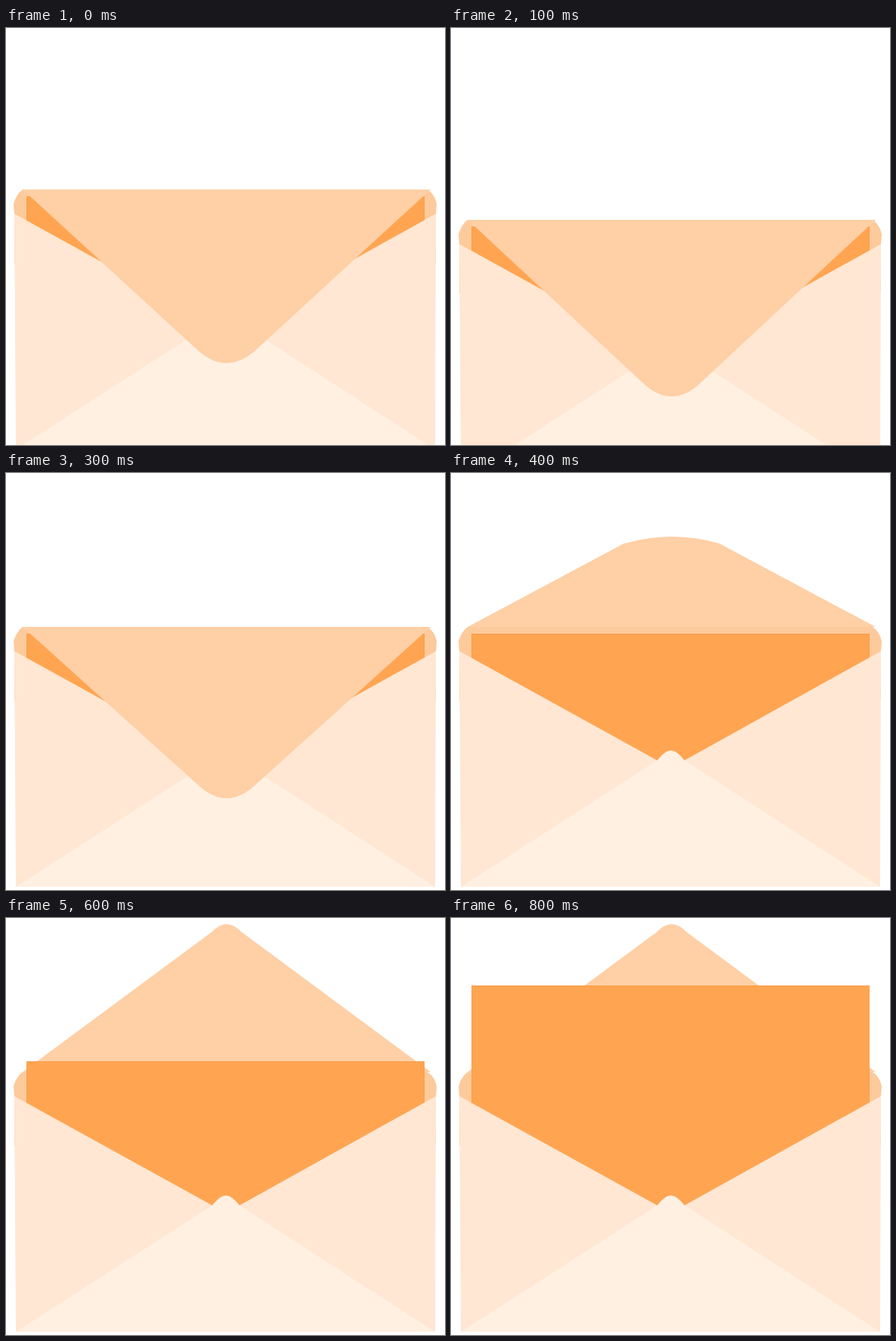
An HTML page without scripts that plays this animation: 579 by 550 pixels, repeating every 900 ms.

```html
<!DOCTYPE html>
<html lang="en">
<head>
<meta charset="utf-8">
<title>Opening envelope</title>
<style>
  html, body { margin: 0; width: 100%; height: 100%; overflow: hidden; background: #fff; }
  svg { display: block; width: 579px; height: 550px; }

  .envelope, .letter, .flap { animation: 900ms infinite; }
  .envelope { animation-name: bob; }
  .letter { animation-name: rise; fill: #ffa552; stroke: #fa9c48; }
  .flap { animation-name: open; fill: #ffcfa5; }
  .back { fill: #fdca9b; }
  .side { fill: #ffe7d3; }
  .pocket { fill: #fff0e2; }

  /* Every segment advances in 50 ms steps. */
  @keyframes bob {
    0% { transform: translateY(10px); animation-timing-function: steps(2); }
    11.1% { transform: translateY(50px); animation-timing-function: steps(2); }
    22.2% { transform: translateY(10px); animation-timing-function: steps(1); }
    27.7%, 100% { transform: translateY(0); }
  }
  @keyframes open {
    0% {
      d: path("M22 203L255 417Q291 447 327 417L560 203Z");
      animation-timing-function: steps(2);
    }
    11.1% {
      d: path("M22 203L255 420Q291 452 327 420L560 203Z");
      animation-timing-function: steps(2);
    }
    22.2% {
      d: path("M22 203L255 417Q291 447 327 417L560 203Z");
      animation-timing-function: steps(2);
    }
    33.3% {
      d: path("M22 203L255 413Q291 445 327 413L560 203Z");
      animation-timing-function: steps(2);
    }
    44.4% {
      d: path("M22 203L228 93Q291 75 354 93L560 203Z");
      animation-timing-function: steps(3);
    }
    61.1%, 100% { d: path("M22 203L272 18Q291 -2 310 18L560 203Z"); }
  }
  @keyframes rise {
    0%, 61.1% { transform: translateY(0); animation-timing-function: steps(1); }
    66.6% { transform: translateY(-23px); animation-timing-function: steps(4); }
    88.8%, 100% { transform: translateY(-123px); }
  }
</style>
</head>
<body>
<svg viewBox="0 0 579 550">
  <clipPath id="front"><rect y="203" width="579" height="260"/></clipPath>
  <g class="envelope">
    <path class="back" d="M11 236L10 222Q13 210 22 203H556Q566 210 568 222L567 236V300L290 410L11 300Z"/>
    <path class="flap"/>
    <rect class="letter" x="27.5" y="212.5" width="524" height="320"/>
    <path class="side" d="M11 235L290 389L300 546H13Z"/>
    <path class="side" d="M567 235L290 389L280 546H566Z"/>
    <path class="pocket" d="M13 546L272 379Q282 366 290 366Q298 366 308 379L566 546Z"/>
    <g clip-path="url(#front)"><path class="flap"/></g>
  </g>
</svg>
</body>
</html>
```
